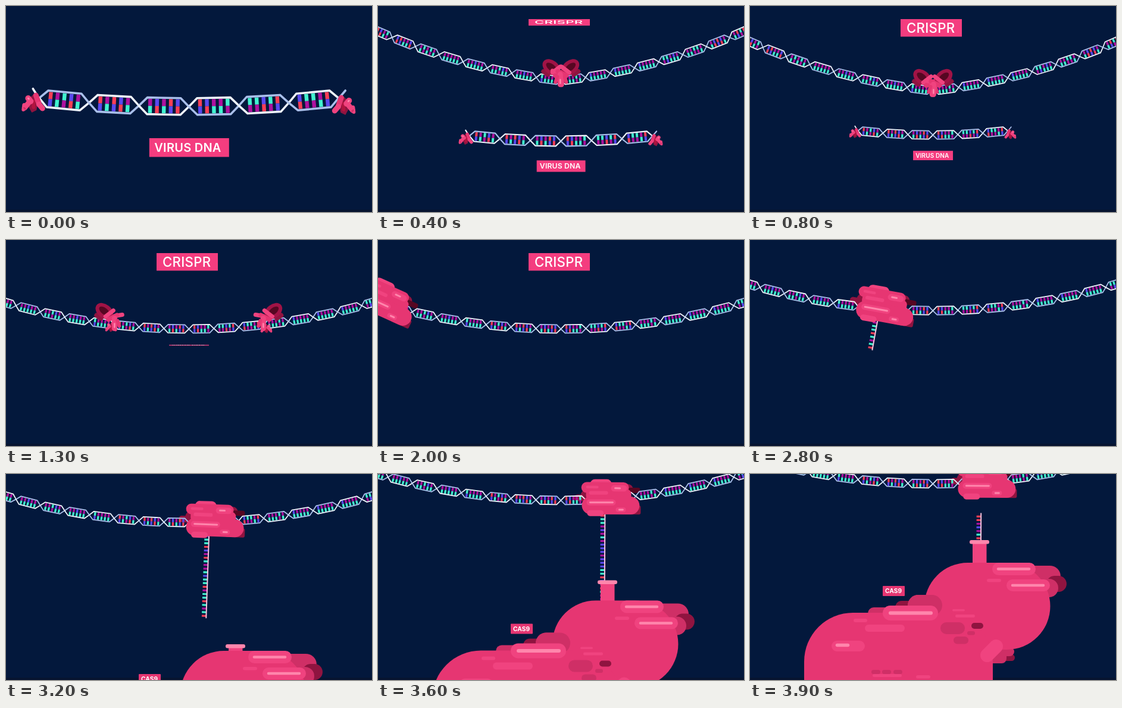
An HTML page that plays this animation: 615x346 px, repeating every 4000 ms.

```html
<!DOCTYPE html>
<html lang="en">
<head>
<meta charset="utf-8">
<title>Gene editing</title>
<style>
html, body { margin: 0; width: 100%; height: 100%; overflow: hidden; background: #03183c; }
svg { display: block; width: 615px; height: 346px; }
text { font-family: Inter, Roboto, sans-serif; fill: #fff; }
</style>
</head>
<body>
<svg id="stage" viewBox="0 0 615 346" xmlns="http://www.w3.org/2000/svg"></svg>
<script>
const LOOP = 4000, STEP = 100, MID = 307.3;
const PINK = '#e63672', LIGHT = '#f0437f', GLOW = '#ff86ac', DEEP = '#cf2f66', DARK = '#8f1440', HOLE = '#560722';
const TEAL = '#41f2cf', INDIGO = '#5a48ee', MAGENTA = '#ae119f', RED = '#f83e56';
const WHITE = '#eef3fb', BLUE = '#a9bfea';
const STRAND = 266;

// Small drawing helpers
const clamp = v => Math.max(0, Math.min(1, v));
const span = (t, a, b) => clamp((t - a) / (b - a));
const inOut = p => p < .5 ? 2 * p * p : 1 - 2 * (1 - p) * (1 - p);
const out = p => 1 - (1 - p) ** 3;
const mix = (a, b, p) => a + (b - a) * p;
const noise = n => { const v = Math.sin(n * 127.1 + 11.7) * 43758.5453; return v - Math.floor(v); };
const rect = (x, y, w, h, fill, r = 0) =>
  `<rect x="${x}" y="${y}" width="${w}" height="${h}" rx="${r}" fill="${fill}"/>`;
const pill = (x1, y1, x2, y2, fill) => rect(x1, y1, x2 - x1, y2 - y1, fill, Math.min(x2 - x1, y2 - y1) / 2);
const line = (x1, y1, x2, y2, w, color, cap = 'round') =>
  `<path d="M${x1} ${y1}L${x2} ${y2}" stroke="${color}" stroke-width="${w}" stroke-linecap="${cap}" fill="none"/>`;
const group = (id, inner, attrs = '') => `<g id="${id}" ${attrs}>${inner}</g>`;

// Double helix hung along a curve; every half twist is 84 units long
function node(k) {
  let x = 0;
  for (let i = 0; i < Math.abs(k); i++) x += Math.sqrt(84 * 84 - (1.6 * (2 * i + 1)) ** 2);
  return [Math.sign(k) * x, -1.6 * k * k];
}

function rungColors(seed, viral) {
  const r = noise(seed);
  let pair;
  if (viral) pair = r < .5 ? [TEAL, MAGENTA] : [INDIGO, RED];
  else pair = r < .82 ? [TEAL, MAGENTA] : [TEAL, INDIGO];
  return noise(seed + 50.3) < (viral ? .5 : .82) ? pair.reverse() : pair;
}

function segment(k) {
  const [x0, y0] = node(k), [x1, y1] = node(k + 1);
  const reach = Math.abs(k + .5), viral = reach < 3 || reach > 9;
  const angle = Math.atan2(y1 - y0, x1 - x0) * 180 / Math.PI;
  let s = '';
  for (let i = 0; i < 5; i++) {
    const [top, low] = rungColors(k * 5 + i + 200, viral);
    const x = (i - 2) * 11.6 - 3.2;
    s += rect(x, -12, 6.4, 12, top) + rect(x, 0, 6.4, 12, low);
  }
  const odd = Math.abs(k) % 2 === 1;
  const edge = (dir, color) =>
    `<path d="M-42 0L-28 ${14 * dir}H28L42 0" fill="none" stroke="${color}" stroke-width="3.6" stroke-linecap="round" stroke-linejoin="round"/>`;
  s += edge(-1, odd ? BLUE : WHITE) + edge(1, odd ? WHITE : BLUE);
  return `<g transform="translate(${(x0 + x1) / 2} ${(y0 + y1) / 2}) rotate(${angle})">${s}</g>`;
}

function helix(from, to) {
  let s = '';
  for (let k = from; k < to; k++) s += segment(k);
  return s;
}

// Grabber at either end of the viral strand
const grabber =
  `<path d="M-6 -8L1 -15L8 -4L5 13L-3 17L-8 8Z" fill="${DARK}"/>` +
  line(0, -2, 0, 8, 6, '#b3133f') +
  line(-9, -7, -5, -2, 10, LIGHT) + line(-7, -1, -15, 9, 9, LIGHT) +
  line(-16, 4, -17, 12, 6, LIGHT) +
  line(4, -12, 9, 2, 9, PINK) + line(9, 3, 15, 10, 9, LIGHT) +
  line(-9, -7, -8, -6, 3, GLOW) + line(-16, 9, -14, 11, 2.5, DEEP);

// Cutter that pulls one half of the host strand aside
const cutter =
  line(-29, -18, -22, -13, 8, DARK) +
  `<ellipse cx="-16" cy="-25" rx="13.5" ry="8.5" transform="rotate(38 -16 -25)" fill="${HOLE}" stroke="#a11346" stroke-width="6"/>` +
  line(-14, -16, -1, -26, 7, LIGHT) + line(2, -17, 14, -19, 7, LIGHT) +
  line(-9, -11, 5, -18, 8, PINK) + line(1, -13, 1, 4, 9, LIGHT) +
  line(6, -9, 9, 0, 6, PINK) + line(1, -4, 1, 2, 2.5, GLOW);

// Reader enzyme
const blobBack =
  pill(-61, -5, -38, 6, DARK) + pill(-50, -14, -28, 10, DARK) +
  pill(4, -23, 38, -6, DARK) + rect(12, -17, 38, 9, HOLE, 3.5) + rect(18, 13, 33, 15, DARK, 3);
const blob =
  pill(-34, -31, 2, -15, LIGHT) + pill(-49, -26, 31, -8, PINK) +
  rect(-41, -14, 76, 18, PINK, 7) + pill(-48, -2, 49, 28, PINK) + pill(-39, 21, -11, 31, LIGHT) +
  pill(-41, -20, -20, -15.5, LIGHT) + pill(-36, -11, -4, -5, LIGHT) +
  pill(1, -21, 28, -10.5, LIGHT) + line(8, -16, 16, -16, 3, GLOW) +
  pill(-40, 3, 9, 13, LIGHT) + line(-34, 8, 4, 8, 3, GLOW) +
  pill(9, 16, 26, 24, LIGHT) + line(15, 20, 21, 20, 3, GLOW);

function singleStrand() {
  let s = '';
  for (let y = 4; y < STRAND; y += 6.1) {
    const color = [TEAL, INDIGO, MAGENTA, RED][Math.floor(noise(y) * 4)];
    s += rect(-7.5, -y - 1.6, 7.5, 3.2, color);
  }
  return s + line(0, 0, 0, -STRAND, 2, '#f7c3dd', 'butt');
}

// Large protein rising from below
const bodyBack =
  pill(430, 154, 522, 190, DEEP) + pill(498, 171, 532, 198, DARK) + pill(486, 176, 518, 207, DEEP) +
  pill(400, 303, 445, 314, DARK) + rect(400, 293, 31, 25, DEEP, 8) + pill(415, 291, 444, 306, DEEP) +
  pill(244, 213, 284, 235, DARK) + pill(265, 203, 323, 240, DEEP) + pill(198, 224, 240, 244, DEEP);
const body =
  rect(293, 149, 211.5, 146, PINK, 73) + rect(91, 233, 317, 200, PINK, 82) +
  pill(265, 203, 323, 238, DEEP) +
  pill(407, 149, 480, 170, LIGHT) + line(417, 159.5, 469, 159.5, 4.5, GLOW) +
  pill(431, 177, 504, 197, LIGHT) + line(441, 187, 493, 187, 4.5, GLOW) +
  pill(398, 176, 422, 181.5, LIGHT) +
  pill(223, 221, 316, 246, LIGHT) + line(236, 233.5, 304, 233.5, 6, GLOW) +
  pill(174, 243, 197, 249, LIGHT) + pill(193, 253, 260, 265, LIGHT) +
  pill(137, 280, 193, 298, LIGHT) + line(146.5, 287.5, 164.5, 287.5, 5.5, GLOW) +
  [204, 222, 241].map(x => pill(x, 329, x + 15, 336, DEEP)).join('') +
  pill(206, 336, 255, 341, LIGHT) + pill(279, 338, 303, 343.5, LIGHT) +
  pill(340, 227, 361, 230.5, LIGHT) + pill(345, 236, 378, 241, LIGHT) +
  pill(320, 249, 361, 269, DEEP) + pill(372, 250, 392, 260, DARK) +
  pill(365, 264, 378, 270.5, DEEP) + pill(342, 273, 367, 285.5, DEEP) +
  line(398.5, 304.5, 413.5, 289.5, 23, LIGHT);
const tag = rect(223, 188, 37, 17, PINK, 1) +
  '<text x="227" y="200.3" font-size="10.2" font-weight="700">CAS9</text>';

const stage = document.getElementById('stage');
stage.innerHTML =
  '<defs><clipPath id="below"><rect x="-40" y="14" width="80" height="400"/></clipPath></defs>' +
  rect(0, 0, 615, 346, '#03183c') + rect(0, 342, 615, 4, '#071430') +
  group('back', blobBack) +
  group('left', helix(-13, -3)) +
  group('right', helix(3, 13)) +
  group('virus', helix(-3, 3) +
    group('ends',
      line(-252, -14, -262, -30, 3.6, WHITE) + line(252, -14, 263, -27, 3.6, BLUE) +
      `<g transform="translate(-261 -7)">${grabber}</g><g transform="translate(260 -3) scale(-1 1)">${grabber}</g>`) +
    group('name', rect(0, 0, 134, 31.5, '#f43d7f') +
      '<text x="8.5" y="22.7" font-size="20" font-weight="560" letter-spacing=".25">VIRUS DNA</text>')) +
  group('cutL', cutter) + group('cutR', cutter) +
  group('title', rect(253, 0, 103, 29.5, '#f43d7f') +
    '<text x="263" y="22.7" font-size="22.2" font-weight="540" letter-spacing=".3">CRISPR</text>') +
  group('reader', group('thread', group('rna', singleStrand()), 'clip-path="url(#below)"') + blob) +
  group('big', bodyBack + group('pipe', rect(374, 114, 23.5, 60, LIGHT) + rect(369, 111, 33, 6.5, GLOW, 3)) + body + tag);

const parts = {};
stage.querySelectorAll('g[id]').forEach(g => parts[g.id] = g);
const place = (id, transform) => parts[id].setAttribute('transform', transform);
const show = (id, on) => parts[id].setAttribute('display', on ? 'inline' : 'none');

// Smooth curve through [time, value] keys
function track(t, keys) {
  const n = keys.length;
  const slope = i => {
    const a = keys[Math.max(0, i - 1)], b = keys[Math.min(n - 1, i + 1)];
    return (b[1] - a[1]) / (b[0] - a[0]);
  };
  let i = 0;
  while (i < n - 2 && t > keys[i + 1][0]) i++;
  const [t0, a] = keys[i], [t1, b] = keys[i + 1], d = t1 - t0, p = clamp((t - t0) / d);
  const m0 = slope(i) * d, m1 = (i === n - 2 ? 0 : slope(i + 1)) * d;
  const p2 = p * p, p3 = p2 * p;
  return a * (2 * p3 - 3 * p2 + 1) + m0 * (p3 - 2 * p2 + p) + b * (3 * p2 - 2 * p3) + m1 * (p3 - p2);
}

// Upward camera drift with a soft start
function drift(t) {
  const s = Math.max(0, t - 2270);
  return .093 * (s < 400 ? s * s / 800 : s - 200);
}

function draw(t) {
  const base = 149.5 - drift(t);

  // Host strand drops in, then parts
  const drop = t < 100 ? -260 : -230 * (1 - out(span(t, 50, 650)));
  const gap = 126 * (1 - inOut(span(t, 760, 1200)));
  const hostY = base + drop;
  place('left', `translate(${MID + gap} ${hostY}) scale(.5)`);
  place('right', `translate(${MID - gap} ${hostY}) scale(.5)`);

  // Viral strand shrinks, dips, then fills the gap
  const size = mix(1, .5, inOut(span(t, 0, 600)));
  const dip = mix(169, 243.5, inOut(span(t, 0, 600)));
  const virusY = t < 1130 ? mix(dip, 149.5, inOut(span(t, 600, 1130))) : base;
  place('virus', `translate(${MID} ${virusY}) scale(${size})`);
  const nameOpen = 1 - .92 * inOut(span(t, 1080, 1300));
  place('name', `translate(-66.5 53) scale(1 ${nameOpen})`);
  show('name', t < 1400);

  // Cutters and grabbers leave through the top
  const fly = span(t, 1300, 1750) ** 2;
  const cutY = hostY - 5 - 190 * fly;
  place('cutL', `translate(${MID - 126 + gap - 30 * fly} ${cutY})`);
  place('cutR', `translate(${MID + 126 - gap + 30 * fly} ${cutY}) scale(-1 1)`);
  place('ends', `translate(0 ${-380 * fly})`);
  ['cutL', 'cutR', 'ends'].forEach(id => show(id, t < 1750));

  const titleOpen = out(span(t, 350, 700)) * (1 - inOut(span(t, 2050, 2350)));
  place('title', `translate(0 22) scale(1 ${titleOpen})`);
  show('title', titleOpen > .01);

  // Reader travels along the strand and feeds out a copy
  const x = track(t, [[1600, -100], [2000, 16], [2800, 228], [3200, 351], [3900, 397.5]]);
  const u = (x - MID) / 42;
  const y = base - 4.6 - (u < 1 ? .8 * u * u + Math.max(0, -u) * .5 : 0);
  const pose = `translate(${x} ${y}) rotate(${Math.max(.3, 25.5 - .067 * x)})`;
  place('reader', pose);
  place('back', pose);
  show('reader', t >= 1600);
  show('back', t >= 1600);
  const fed = .22 * (t - 2574);
  place('rna', `translate(-9 ${28 + fed})`);
  show('thread', fed > 0);

  // Protein rises while its tube extends
  place('big', `translate(0 ${148 * (3900 - t) / 700})`);
  place('pipe', `translate(0 ${27 * (1 - inOut(span(t, 3200, 3750)))})`);
  show('big', t >= 2700);
}

const start = performance.now();
function tick() {
  const t = (performance.now() - start) % LOOP;
  draw(Math.floor(t / STEP) * STEP);
  requestAnimationFrame(tick);
}
draw(0);
requestAnimationFrame(tick);
</script>
</body>
</html>
```
